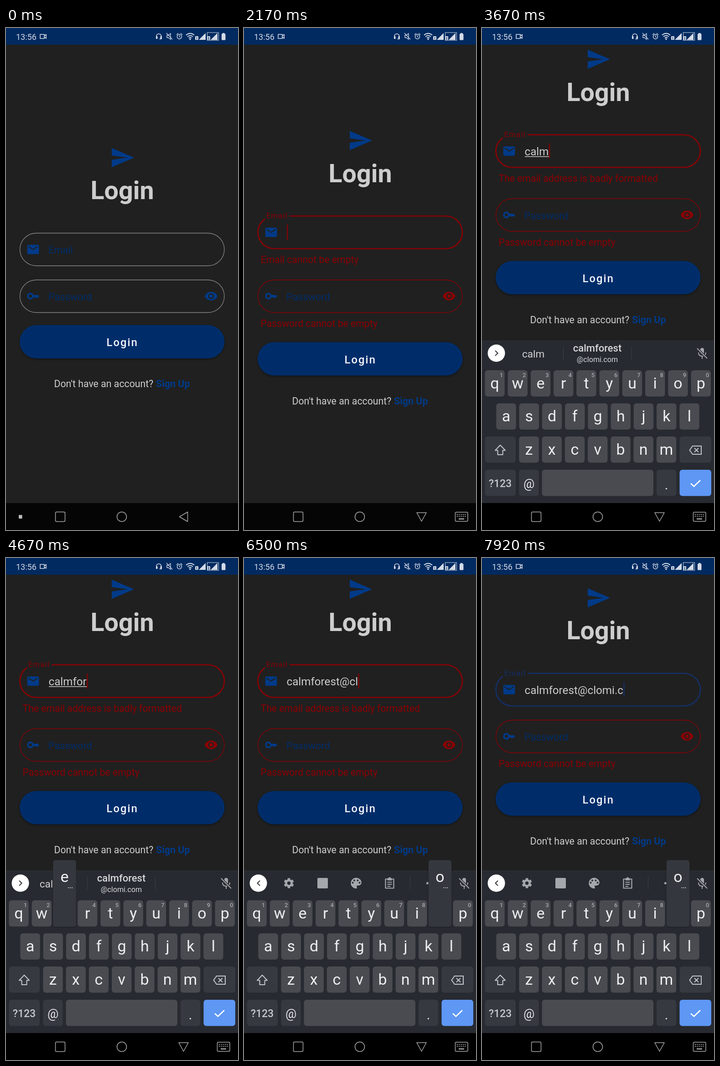
Animation, 509 px wide and 1100 px high, one loop 8 s. Source, as an HTML page:

```html
<!DOCTYPE html>
<html lang="en">
<head>
<meta charset="utf-8">
<title>Login form</title>
<style>
  html, body { margin: 0; width: 100%; height: 100%; overflow: hidden; background: #202020; }
  svg { display: block; width: 100%; height: 100%; font-family: Roboto, "Open Sans", sans-serif; }
  text { white-space: pre; }
</style>
</head>
<body>
<svg id="stage" viewBox="0 0 509 1100" xmlns="http://www.w3.org/2000/svg"></svg>
<script>
const LOOP = 8000;
const BG = '#202020', RED = '#8b0004', BLUE = '#003a88', HINT = '#002d69', PALE = '#cdcdcd';
const GREY = '#a4a7ab', KEY = '#494b50', DARK_KEY = '#363940', POPUP = '#34373d';
const NAME = 'calmforest', HOST = '@clomi.com';

// character, time it is entered, time its key is pressed
const TYPING = [
  ['c', 2830, 2580], ['a', 3080, 3080], ['l', 3250, 3080], ['m', 3500, 3420], ['f', 3830, 3750],
  ['o', 4420, 4330], ['r', 4580, 4500], ['e', 4750, 4670], ['s', 4920, 4830], ['t', 5080, 5000],
  ['@', 5580, 5500], ['c', 6250, 6170], ['l', 6420, 6330], ['o', 6580, 6500], ['m', 6670, 6580],
  ['i', 6830, 6750], ['.', 7170, 7080], ['c', 7830, 7750], ['o', 8000, 7910]
];

const text = (x, y, size, fill, str, extra = '') =>
  `<text x="${x}" y="${y}" font-size="${size}" fill="${fill}" ${extra}>${str}</text>`;
const rect = (x, y, w, h, r, fill, extra = '') =>
  `<rect x="${x}" y="${y}" width="${w}" height="${h}" rx="${r}" fill="${fill}" ${extra}/>`;
const line = (d, color, w = 1.5, extra = '') =>
  `<path d="${d}" fill="none" stroke="${color}" stroke-width="${w}" ${extra}/>`;
const dot = (x, y, r, fill, extra = '') => `<circle cx="${x}" cy="${y}" r="${r}" fill="${fill}" ${extra}/>`;
const at = (x, y, body, extra = '') => `<g transform="translate(${x} ${y})" ${extra}>${body}</g>`;
// icon drawn on a 24 unit grid, centred on x, y
const icon = (x, y, scale, d, fill, extra = '') =>
  `<path transform="translate(${x} ${y}) scale(${scale}) translate(-12 -12)" d="${d}" fill="${fill}" fill-rule="evenodd" ${extra}/>`;
const MID = 'text-anchor="middle"';
const MID_MEDIUM = MID + ' font-weight="500"';

const SEND = 'M2 21L23 12 2 3 2 10l15 2-15 2z';
const MAIL = 'M20 4H4c-1.1 0-2 .9-2 2v12c0 1.1.9 2 2 2h16c1.1 0 2-.9 2-2V6c0-1.1-.9-2-2-2zm0 4l-8 5-8-5V6l8 5 8-5z';
const LOCK_KEY = 'M12.65 10C11.83 7.67 9.61 6 7 6c-3.31 0-6 2.69-6 6s2.69 6 6 6c2.61 0 4.83-1.67 5.65-4H15l2 2 2-2 2 1.5 2-3.5-2-2zM7 15a3 3 0 1 1 0-6 3 3 0 0 1 0 6z';
const EYE = 'M12 4.5C7 4.5 2.73 7.61 1 12c1.73 4.39 6 7.5 11 7.5s9.27-3.11 11-7.5c-1.73-4.39-6-7.5-11-7.5zM12 17a5 5 0 1 1 0-10 5 5 0 0 1 0 10zm0-8a3 3 0 1 0 0 6 3 3 0 0 0 0-6z';
const PALETTE = 'M12 3a9 9 0 0 0 0 18c.83 0 1.5-.67 1.5-1.5 0-.39-.15-.74-.39-1-.23-.27-.38-.62-.38-1 0-.83.67-1.5 1.5-1.5H16c2.76 0 5-2.24 5-5 0-4.42-4.03-8-9-8z';

function statusBar() {
  const c = '#d3dae6';
  const signal = (x, n) => `<path d="M${x} 26h15V11z" fill="${c}"/>` +
    rect(x - 8, 18, 7, 8, 1, c) + text(x - 4.5, 25, 7, '#002a60', n, MID + ' font-weight="700"');
  return rect(0, 0, 509, 36.5, 0, '#002a60') + text(22, 26, 18, c, '13:56') +
    line('M75 14h9v9h-9zM84 17l4-2.5v8l-4-2.5', c, 1.6) +
    line('M330 21v-3a5.3 5.3 0 0 1 10.600v6h-4', c, 1.6).replace('10.600v6', '10.6 0v6') +
    rect(329, 18, 3.5, 6, 1, c) + rect(338.5, 18, 3.5, 6, 1, c) +
    line('M353 16h3l5-4v13l-5-4h-3zM352 11l13 14', c, 1.3) +
    dot(380.5, 19, 5, 'none', `stroke="${c}" stroke-width="1.4"`) +
    line('M380.500 16v3l2 1.500M374 15l4-3.500M387 15l-4-3.500', c, 1.3) +
    line('M395 15.500Q404 8 413 15.500M398 19Q404 14 410 19M401 22Q404 19.500 407 22', c, 1.8) +
    dot(404, 24.5, 1.7, c) + signal(423, '1') + signal(449, '2') +
    rect(441.5, 10, 25, 17, 0, 'none', `stroke="${c}"`) +
    rect(473, 12.5, 8.5, 14, 1.5, c) + rect(475, 11, 4.500, 2, 0, c);
}

function navBar() {
  const c = '#a9a9a9';
  const keys = [0, 1, 2, 3, 4].map(i =>
    rect(467 + i * 4.3, 1065, 2, 2, 0, c) + rect(467 + i * 4.3, 1069, 2, 2, 0, c)).join('');
  return rect(0, 1041, 509, 59, 0, '#050505', 'id="navBg"') +
    rect(108.5, 1060.5, 21, 21, 2.5, 'none', `stroke="${c}" stroke-width="1.5"`) +
    dot(254, 1071, 10.5, 'none', `stroke="${c}" stroke-width="1.5"`) +
    `<g id="navIdle">${rect(28, 1067, 7.5, 8, 1, '#bdbdbd')}
      ${line('M380.500 1071L398.500 1060.500V1081.500Z', c, 1.5, 'stroke-linejoin="round"')}</g>` +
    `<g id="navTyping">${line('M379 1062H400L389.500 1081Z', c, 1.5, 'stroke-linejoin="round"')}
      ${rect(463.500, 1061, 27.5, 20, 2, 'none', `stroke="${c}" stroke-width="1.5"`)}
      ${keys}${rect(471, 1074.500, 12, 2.500, 0, c)}</g>`;
}

function form() {
  const box = id => rect(30.5, .5, 448.5, 71.500, 36, 'none', `id="${id}"`);
  const button = rect(30, 0, 449.5, 73, 36.5, '#002d6a', 'style="filter:drop-shadow(0 2px 2px rgba(0,0,0,.4))"') +
    rect(30, 0, 449.5, 73, 36.5, '#fff', 'id="ripple" opacity="0"') +
    text(220.5, 46, 23.7, '#f4f6fa', 'Login', 'font-weight="500" letter-spacing="2.1"');
  return '<g id="head">' + icon(255.3, 284, 2.33, SEND, BLUE) +
    text(255, 375, 55.6, PALE, 'Login', MID + ' font-weight="700"') + '</g>' +
    '<g id="email">' + box('emailBox') + rect(46, -8, 54, 18, 0, BG, 'id="notch"') +
    text(93, 45, 21.7, HINT, 'Email', 'id="label"') + icon(59.5, 36.2, 1.28, MAIL, BLUE) +
    text(93.5, 45.3, 24.2, PALE, '', 'id="typed"') +
    rect(94, 47.5, 0, 1.5, 0, PALE, 'id="underline"') +
    rect(94, 19.5, 2.2, 33, 0, RED, 'id="caret"') +
    text(36.5, 103, 21.2, RED, '', 'id="emailError"') + '</g>' +
    '<g id="pass">' + box('passBox') + icon(59.5, 36, 1.2, LOCK_KEY, BLUE) +
    text(93, 45, 21.7, HINT, 'Password') + icon(450, 36, 1.27, EYE, BLUE, 'id="eye"') +
    text(36.5, 103.5, 21.2, RED, 'Password cannot be empty', 'id="passError"') + '</g>' +
    `<g id="button">${button}</g>` +
    '<g id="foot">' + text(105.5, 787, 21.3, PALE, "Don't have an account?") +
    text(329, 787, 21.4, BLUE, 'Sign Up', 'font-weight="700"') + '</g>';
}

const keyPlace = {};
function letterRow(chars, x0, top) {
  return [...chars].map((ch, i) => {
    const x = x0 + i * 50.25;
    keyPlace[ch] = [x, top];
    const digit = top === 750 ? text(x + 14.5, 765, 13, GREY, (i + 1) % 10, MID_MEDIUM) : '';
    return rect(x - 21.7, top, 43.4, 57.5, 6, KEY) + text(x, top + 39.5, 34, '#eceef0', ch, MID) + digit;
  }).join('');
}

function toolbar() {
  const teeth = [0, 60, 120].map(a => line('M0-11V11', GREY, 5.5, `transform="rotate(${a})"`)).join('');
  const gear = teeth + dot(0, 0, 8.5, GREY) + dot(0, 0, 3.7, '#282b31');
  const wells = [[-7.5, -1], [-4, -6], [3.500, -6], [7.500, -1]].map(([x, y]) => dot(x, y, 1.9, '#282b31')).join('');
  const board = line('M-9-9H9V11H-9Z', GREY, 2.2, 'stroke-linejoin="round"') + rect(-5, -11, 10, 5, 1, GREY) +
    dot(0, -10.500, 2.500, GREY) + line('M-5-2H5M-5 2.500H5M-5 7H2', GREY, 2);
  return '<g id="tools">' + at(98.500, 712.5, gear) + rect(161, 701, 23, 23, 2, GREY) +
    at(246, 712.5, icon(0, 0, 1.3, PALETTE, GREY) + wells) + at(319.5, 712.5, board) +
    line('M364.500 698V727', '#3b3e44', 1) + [402.5, 410, 417.5].map(x => dot(x, 712.5, 2.600, GREY)).join('') +
    line('M35 707L29.500 712.500L35 718', '#3c4043', 2.2) + '</g>' +
    '<g id="tips">' + line('M29 707L34.500 712.500L29 718', '#3c4043', 2.2) +
    text(112.5, 721.5, 22.5, '#cfd1d4', '', MID + ' id="tip"') +
    text(253, 709, 22, '#d5d7da', NAME, MID_MEDIUM) +
    text(253, 732, 16.2, '#d5d7da', HOST, MID) +
    line('M178.500 698V727M327.500 698V727', '#3b3e44', 1) + '</g>';
}

function keyboard() {
  const side = (x, y, w, fill = DARK_KEY) => rect(x, y, w, 57.500, 6, fill);
  keyPlace['@'] = [103, 968];
  keyPlace['.'] = [404.5, 968];
  const mic = rect(-4, -12, 8, 14, 4, GREY) + line('M-8-2Q-8 6 0 6Q8 6 8-2M0 6V12', GREY, 2) +
    line('M-11-11L11 11', '#282b31', 5) + line('M-11-11L11 11', GREY, 2);
  return rect(0, 685, 509, 360, 0, '#272a30') + line('M0 685.500H509', '#303339', 1) +
    dot(31.500, 712.5, 19, '#fff') + toolbar() + at(483, 713, mic) +
    letterRow('qwertyuiop', 28, 750) + letterRow('asdfghjkl', 53, 822.5) + letterRow('zxcvbnm', 103, 895) +
    side(6.500, 895, 67.5) + line('M40 914L51 925.500H45.500V935H34.500V925.500H29Z', '#c3c6ca', 2, 'stroke-linejoin="round"') +
    side(433.500, 895, 69.5) + line('M462 916H481V934H462L455.500 925ZM466 920.500L475 929.500M475 920.500L466 929.500', '#c3c6ca', 2) +
    side(6.500, 968, 67.5) + text(40, 1006, 23, '#c6c9cd', '?123', MID_MEDIUM) +
    side(81.300, 968, 43.4) + text(103, 1007.5, 27, '#e4e6e9', '@', MID) +
    side(131.500, 968, 244.5, KEY) + side(382.800, 968, 43.4) + text(404.5, 1011, 29, '#e4e6e9', '.', MID) +
    side(433.500, 968, 69.5, '#5e97f4') + line('M458 998L465 1004.500L479 991', '#fff', 2.6) +
    '<g id="popup">' + rect(-25.3, -88, 50.6, 146, 5, POPUP, 'style="filter:drop-shadow(0 1px 1px rgba(0,0,0,.35))"') +
    text(0, -40, 34, '#f0f1f3', '', MID + ' id="popChar"') +
    [8.500, 12.500, 16.5].map(x => dot(x, -27.5, 1.1, '#e0e2e5')).join('') + '</g>';
}

const stage = document.getElementById('stage');
stage.innerHTML = rect(0, 0, 509, 1100, 0, BG) + form() + statusBar() +
  `<g id="keyboard">${keyboard()}</g>` + navBar();

const el = {};
stage.querySelectorAll('[id]').forEach(n => el[n.id] = n);
const set = (id, attrs) => { for (const k in attrs) el[id].setAttribute(k, attrs[k]); };
const show = (id, on) => el[id].setAttribute('visibility', on ? 'inherit' : 'hidden');
const move = (id, y) => set(id, { transform: `translate(0 ${y})` });
const write = (id, str) => { if (el[id].textContent !== str) el[id].textContent = str; };
const ramp = (t, a, b) => Math.min(1, Math.max(0, (t - a) / (b - a)));
const easeOut = p => 1 - (1 - p) ** 3;
const mix = (a, b, p) => a + (b - a) * p;

function drawForm(t) {
  const failed = t >= 1410, focused = t >= 1995, valid = t >= 7830;
  const emailBad = failed && !valid;
  const top = (t >= 2245 ? -178 : 0) - 18.75 * (emailBad + failed);
  const afterEmail = top + (emailBad ? 37.5 : 0);
  const afterPass = afterEmail + (failed ? 37.5 : 0);
  move('head', top);
  move('email', 449 + top);
  move('pass', 551.5 + afterEmail);
  move('button', 651 + afterPass);
  move('foot', afterPass);

  const active = valid ? '#142f66' : RED;
  set('emailBox', { stroke: failed ? active : '#858585', 'stroke-width': focused ? 2.7 : 1.3 });
  set('passBox', { stroke: failed ? RED : '#858585', 'stroke-width': 1.3 });
  set('eye', { fill: failed ? RED : BLUE });

  const p = easeOut(ramp(t, 1980, 2150));
  set('label', {
    x: mix(93, 48.7, p), y: mix(45, 5.5, p), 'font-size': mix(21.7, 16.5, p),
    'letter-spacing': 1.3 * p, fill: focused ? active : HINT
  });
  show('notch', p > .5);

  const fade = ramp(t, 1360, 1660);
  write('emailError', t >= 2825 ? 'The email address is badly formatted' : 'Email cannot be empty');
  show('emailError', emailBad);
  show('passError', failed);
  set('emailError', { opacity: fade });
  set('passError', { opacity: fade });
  set('ripple', { opacity: .12 * Math.sin(Math.PI * ramp(t, 1300, 1670)) });

  const value = TYPING.filter(k => t >= k[1] - 5).map(k => k[0]).join('');
  write('typed', value);
  const width = value ? el.typed.getComputedTextLength() : 0;
  set('caret', { x: 94 + width, fill: active });
  show('caret', t >= 2080 && !(t >= 5915 && t < 6165));
  set('underline', { width });
  show('underline', t < 5575);
  write('tip', value);
}

function drawKeyboard(t) {
  const open = t >= 2160;
  show('navIdle', !open);
  show('navTyping', open);
  set('navBg', { fill: t >= 2245 ? '#000' : '#050505' });
  show('keyboard', t >= 2200);
  move('keyboard', 356 * (1 - easeOut(ramp(t, 2200, 2325))));
  const tips = t >= 2825 && t < 5660;
  show('tips', tips);
  show('tools', !tips);

  const held = TYPING.find(k => t >= k[2] - 5 && t < k[1] - 5);
  show('popup', held);
  if (held) {
    set('popup', { transform: `translate(${keyPlace[held[0]]})` });
    write('popChar', held[0]);
  }
}

function update(t) {
  drawForm(t);
  drawKeyboard(t);
}

const start = performance.now();
function frame(now) {
  update(Math.max(0, now - start) % LOOP);
  requestAnimationFrame(frame);
}
update(0);
requestAnimationFrame(frame);
</script>
</body>
</html>
```
